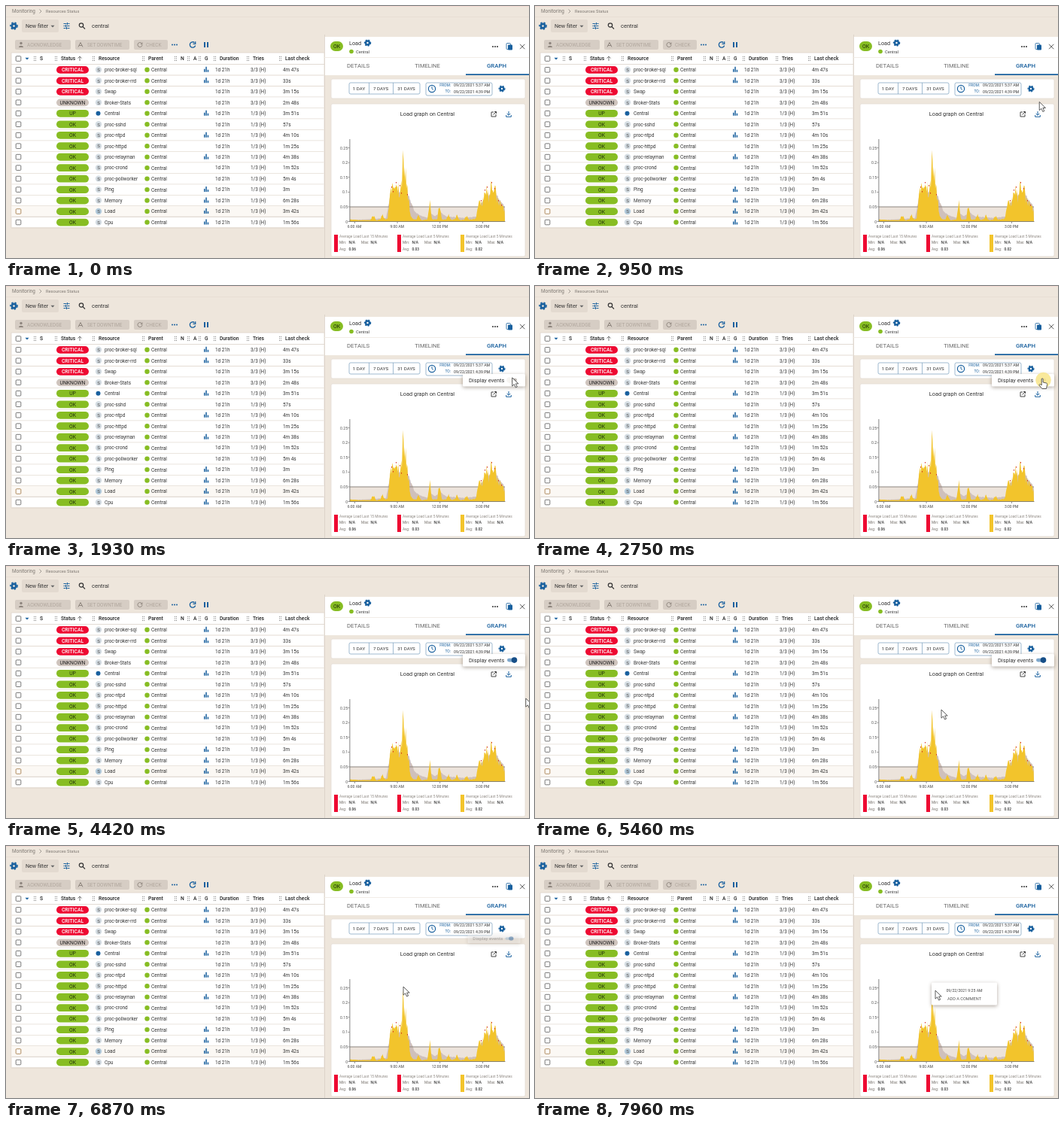
Animation, 695 px wide and 335 px high, one loop 8 s. Source, as an HTML page with a canvas:

```html
<!DOCTYPE html>
<html lang="en">
<head>
<meta charset="utf-8">
<style>
html, body { margin: 0; width: 100%; height: 100%; overflow: hidden; background: #eee6dc; }
canvas { display: block; }
</style>
</head>
<body>
<canvas id="stage" width="695" height="335"></canvas>
<script>
const LOOP = 8000;
const BG = '#eee6dc', BLUE = '#19609e', RED = '#ee0a32', GREEN = '#87bd23', YELLOW = '#f2c42c';
const INK = '#333', GREY = '#77716b', LINE = '#e4dcd3';
const stage = document.getElementById('stage');
let c;

// Drawing helpers
function box(x, y, w, h, fill, stroke, r = 0) {
  c.beginPath();
  c.roundRect(x, y, w, h, r);
  if (fill) { c.fillStyle = fill; c.fill(); }
  if (stroke) { c.strokeStyle = stroke; c.lineWidth = 0.8; c.stroke(); }
}
function text(s, x, y, size, color = INK, align = 'left', weight = 400) {
  c.font = `${weight} ${size}px Roboto, "Liberation Sans", sans-serif`;
  c.textAlign = align;
  c.textBaseline = 'middle';
  c.fillStyle = color;
  c.fillText(s, x, y + 0.5);
}
function disc(x, y, r, color) {
  c.beginPath();
  c.arc(x, y, r, 0, 7);
  c.fillStyle = color;
  c.fill();
}
function path(d, x, y, color, width, fill) {
  c.save();
  c.translate(x, y);
  const p = new Path2D(d);
  if (fill) { c.fillStyle = fill; c.fill(p); }
  if (width) { c.strokeStyle = color; c.lineWidth = width; c.stroke(p); }
  c.restore();
}
function raised(x, y, w, h) {
  c.save();
  c.shadowColor = 'rgba(60,40,20,.4)';
  c.shadowBlur = 5;
  c.shadowOffsetY = 1.5;
  box(x, y, w, h, '#fff', null, 1.5);
  c.restore();
}

// Icons
function gear(x, y, r) {
  c.strokeStyle = BLUE;
  c.lineWidth = r * 0.55;
  c.beginPath();
  c.arc(x, y, r * 0.55, 0, 7);
  c.stroke();
  c.lineWidth = r * 0.3;
  c.setLineDash([r * 0.46, r * 0.43]);
  c.beginPath();
  c.arc(x, y, r * 0.92, 0, 7);
  c.stroke();
  c.setLineDash([]);
}
function dots(x, y, color, r = 1) {
  for (const d of [-3, 0, 3]) disc(x + d, y, r, color);
}
function grip(x, y) {
  for (const dx of [0, 2]) for (const dy of [-2.5, 0, 2.5]) box(x + dx, y + dy - 0.5, 1, 1, '#777');
}
function bars(x, y) {
  box(x - 3, y - 1, 1.5, 4, BLUE);
  box(x - 0.7, y - 4, 1.5, 7, BLUE);
  box(x + 1.7, y, 1.5, 3, BLUE);
}
function checkbox(x, y, color = '#555') {
  box(x - 3.3, y - 3.3, 6.6, 6.6, '#fff', color, 1);
}
function caret(x, y, color) {
  path('M-2.5-1.2h5L0 1.5z', x, y, color, 0, color);
}

function topBars() {
  box(0, 0, 695, 335, BG);
  box(0, 0, 695, 1, '#f3d9d1');
  box(0, 14, 695, 1, '#e8dfd5');
  text('Monitoring', 8, 7, 6.4, '#7d7771');
  path('M-1.5-2.5L1 0l-2.5 2.5', 46, 7, '#8d8781', 0.8);
  text('Resources Status', 53, 7, 5.7, '#7d7771');

  gear(10.5, 26.5, 5);
  box(21, 18, 49, 17, '#e3dad0', null, 2);
  text('New filter', 26, 26.5, 7.1);
  caret(62, 27, '#666');
  path('M-4-3h4M2-3h2M-4 0h2M0 0h4M-4 3h3M1 3h3M1-4.5v3M-1-1.5v3M0 1.5v3', 80.5, 26.5, BLUE, 1.1);
  path('M1.2 1.2L4 4M1.7-1a2.7 2.7 0 1 1-5.4 0a2.7 2.7 0 1 1 5.4 0', 101, 26.5, INK, 1.2);
  text('central', 114, 26.5, 7.5);

  const actions = [[12, 74, 'ACKNOWLEDGE'], [92, 72, 'SET DOWNTIME'], [170, 45, 'CHECK']];
  for (const [x, w, label] of actions) {
    box(x, 45, w, 13, '#d6cdc4', null, 2);
    text(label, x + 16, 51.5, 6.4, '#b0a69d');
  }
  disc(20, 49.5, 1.7, '#8e857d');
  path('M-3 3c0-3 6-3 6 0z', 20, 52, 0, 0, '#8e857d');
  path('M-3 3L0-3L3 3M-2 1h4', 99, 51.5, '#8e857d', 1);
  path('M3 0a3 3 0 1 1-1-2.2M3-3v2H1', 178, 51.5, '#8e857d', 1);
  dots(224, 51.5, BLUE);
  path('M3.6 1A3.7 3.7 0 1 1 2.5-2.8M3.7-4.3v3.2H.5', 248, 51.5, BLUE, 1.3);
  box(263, 48, 2, 7, BLUE);
  box(267, 48, 2, 7, BLUE);
}

const ROWS = [
  ['CRITICAL', 'proc-broker-sql', '4m 47s', 1], ['CRITICAL', 'proc-broker-rrd', '33s', 1],
  ['CRITICAL', 'Swap', '3m 15s'], ['UNKNOWN', 'Broker-Stats', '2m 48s'],
  ['UP', 'Central', '3m 51s', 1], ['OK', 'proc-sshd', '57s'],
  ['OK', 'proc-ntpd', '4m 10s', 1], ['OK', 'proc-httpd', '1m 25s'],
  ['OK', 'proc-relayman', '4m 38s', 1], ['OK', 'proc-crond', '1m 52s'],
  ['OK', 'proc-pollworker', '5m 4s'], ['OK', 'Ping', '3m', 1],
  ['OK', 'Memory', '6m 28s', 1], ['OK', 'Load', '3m 42s', 1], ['OK', 'Cpu', '1m 56s', 1]
];
const PILL = { CRITICAL: [RED, '#fff'], UNKNOWN: ['#cfc4bd', '#222'] };

function table() {
  box(7, 62, 416, 233, '#fff', '#ddd4ca');
  checkbox(16.5, 70);
  caret(28, 70, BLUE);
  const heads = [[45, 'S'], [73, 'Status'], [123, 'Resource'], [189, 'Parent'], [232, 'N'],
    [249, 'A'], [264, 'G'], [284, 'Duration'], [328, 'Tries'], [371, 'Last check']];
  for (const [x, label] of heads) {
    grip(x - 8, 70);
    text(label, x, 70, 6.7, '#222', 'left', 500);
  }
  path('M0 3V-3M-2.5-.5L0-3L2.5-.5', 98, 70, '#555', 0.8);
  box(7, 77, 416, 0.8, '#d8cfc6');

  ROWS.forEach(([status, name, last, graph], i) => {
    const y = 84.8 + i * 14.48, picked = name === 'Load';
    const [fill, ink] = PILL[status] || [GREEN, '#22310a'];
    if (picked) box(7.5, y - 7, 415, 14, '#fbf8f4');
    box(7.5, y + 6.8, 415, 0.8, picked ? '#d8cfc6' : LINE);
    checkbox(16.5, y, picked ? '#9b6c34' : undefined);
    box(67, y - 4.8, 43, 9.8, fill, null, 4.9);
    text(status, 88.5, y, 6.8, ink, 'center', status === 'CRITICAL' ? 500 : 400);
    if (status === 'UP') {
      disc(122.5, y, 3, BLUE);
    } else {
      disc(123, y, 4.2, picked ? '#b3cbdc' : '#d5dde3');
      text('S', 123, y, 6.2, '#444', 'center');
    }
    text(name, 131, y, 6.4);
    disc(187.5, y, 3.2, GREEN);
    text('Central', 193, y, 6.6);
    if (graph) bars(266, y);
    text('1d 21h', 278, y, 6.4);
    text(i < 4 ? '3/3 (H)' : '1/3 (H)', 325, y, 6.4);
    text(last, 368, y, 6.4);
  });
}

function panel() {
  box(423, 38, 272, 297, BG);
  box(423, 41, 272, 51, '#fff');
  box(423, 38, 0.8, 297, '#d8cfc6');
  box(431, 47, 17, 13, GREEN, null, 6.5);
  text('OK', 439.5, 53.5, 7, '#22310a', 'center');
  text('Load', 456, 49, 7.3);
  gear(480.5, 49, 4.4);
  disc(459, 60.5, 2.8, GREEN);
  text('Central', 465, 60.5, 5.7, '#444');
  dots(650, 54, '#333');
  box(665, 49.5, 5.5, 8, null, BLUE, 1);
  box(667, 51.5, 6, 7, BLUE, null, 1);
  path('M-3-3.2L3.4 3.2M3.4-3.2L-3 3.2', 686, 54, '#444', 0.9);
  box(423, 68, 272, 0.8, '#eee7df');
  text('DETAILS', 468, 79.5, 7.8, '#666', 'center');
  text('TIMELINE', 560, 79.5, 7.6, '#666', 'center');
  text('GRAPH', 652, 79.5, 7.8, BLUE, 'center', 500);
  box(611, 90.3, 84, 1.7, BLUE);

  box(432, 97, 258, 26, '#fff', LINE, 2);
  box(456, 102, 94, 15, null, '#88a9c4', 2);
  box(482, 102, 0.8, 15, '#88a9c4');
  box(514, 102, 0.8, 15, '#88a9c4');
  text('1 DAY', 469, 109.5, 6.2, INK, 'center');
  text('7 DAYS', 498, 109.5, 6.2, INK, 'center');
  text('31 DAYS', 532, 109.5, 6.2, INK, 'center');
  box(558, 102, 88, 17, null, '#88a9c4', 2);
  c.beginPath();
  c.arc(566, 110, 4.6, 0, 7);
  c.strokeStyle = BLUE;
  c.lineWidth = 1.2;
  c.stroke();
  path('M0-3V0l2 1.5', 566, 110, BLUE, 0.9);
  text('FROM:', 591, 105, 5, BLUE, 'right');
  text('TO:', 591, 113.5, 5, BLUE, 'right');
  text('09/22/2021 5:37 AM', 595, 105, 5.2);
  text('09/22/2021 4:39 PM', 595, 113.5, 5.2);
  gear(659, 110, 4.2);

  box(432, 130, 258, 203, '#fff', LINE, 2);
  text('Load graph on Central', 560, 143, 7.4, INK, 'center');
  path('M0-3h-3v6h6V0M1-3.5h2.5V-1M3.5-3.5L-.5.5', 648, 144, '#333', 0.9);
  path('M0-4V1M-2.3-1L0 1.3L2.3-1M-3.3 1v2.3h6.6V1', 668, 144, BLUE, 1);
}

// Chart: [x, height in px] outlines
const LOAD1 = [[457, 3], [470, 2], [484, 2], [488, 10], [492, 2], [497, 3], [500, 11], [504, 3], [507, 5],
  [510, 36], [513, 52], [517, 46], [520, 54], [524, 50], [526, 62], [527.5, 105], [529, 66], [531, 88],
  [532.5, 52], [535, 38], [537, 12], [540, 4], [545, 3], [548, 9], [552, 2], [560, 3], [563.5, 29],
  [566, 3], [573, 3], [576, 28], [579, 3], [585, 3], [588, 11], [591, 3], [596, 3], [599, 10], [603, 2],
  [609, 3], [612, 9], [615, 3], [624, 4], [627, 20], [630, 34], [633, 30], [636, 45], [639, 50], [641, 36],
  [644, 57], [647, 40], [650, 54], [652, 32], [656, 30], [659, 24], [663, 18]];
const LOAD15 = [[457, 2], [480, 3], [505, 5], [511, 38], [520, 45], [527, 42], [532, 46], [537, 30], [543, 14],
  [549, 9], [560, 5], [564, 12], [570, 7], [577, 13], [585, 7], [610, 5], [625, 7], [631, 26], [640, 38],
  [650, 40], [656, 30], [663, 20]];

function heightAt(points, x) {
  const i = Math.max(1, points.findIndex(p => p[0] >= x));
  const [x0, h0] = points[i - 1], [x1, h1] = points[i];
  return h0 + (h1 - h0) * (x - x0) / (x1 - x0);
}
function area(points, rough, fill) {
  let seed = 11;
  c.beginPath();
  c.moveTo(457, 286.5);
  for (let x = 457; x <= 663; x += 0.75) {
    seed = seed * 16807 % 2147483647;
    c.lineTo(x, 286.5 - heightAt(points, x) * (1 - rough * (seed / 2147483647) ** 2));
  }
  c.lineTo(663, 286.5);
  c.fillStyle = fill;
  c.fill();
}
function chart() {
  box(457, 267, 206, 19.5, '#ece3db');
  area(LOAD15, 0.12, '#cfc0bb');
  box(457, 266.6, 206, 0.9, '#8d8580');
  area(LOAD1, 0.38, YELLOW);
  for (const [x, h] of [[512, 46], [514, 40], [518, 52], [523, 48], [525, 38], [533, 36], [631, 28],
    [636, 42], [639, 46], [645, 52], [649, 44], [654, 28], [658, 22]]) box(x, 286 - h, 1, 1.6, '#d22a20');
  box(456.5, 177, 0.8, 110, '#666');
  box(456.5, 286.3, 207, 0.8, '#666');
  ['0', '0.05', '0.1', '0.15', '0.2', '0.25'].forEach((label, i) => {
    const y = 286.5 - i * 19.6;
    box(454.5, y - 0.3, 2, 0.7, '#666');
    text(label, 454, y, 5.1, '#555', 'right');
  });
  ['6:00 AM', '9:00 AM', '12:00 PM', '3:00 PM'].forEach((label, i) => {
    const x = 463 + i * 56.7;
    box(x, 287, 0.7, 2, '#666');
    text(label, x, 293.5, 5, '#444', 'center');
  });
  [[436, RED, '15', '0.06'], [520, RED, '5', '0.03'], [604, YELLOW, '5', '0.02']].forEach(([x, color, mins, avg]) => {
    box(x, 304, 5, 23, color);
    text(`Average Load Last ${mins} Minutes`, x + 7, 306.5, 4.8, '#8f8983');
    for (const [label, value, dx, dy] of [['Min:', 'N/A', 7, 314.5], ['Max:', 'N/A', 36, 314.5], ['Avg:', avg, 7, 323]]) {
      text(label, x + dx, dy, 4.8, GREY);
      text(value, x + dx + 12.5, dy, 4.8, '#333', 'left', 500);
    }
  });
}

// Motion
const ramp = (t, a, b) => Math.min(1, Math.max(0, (t - a) / (b - a)));
const ease = p => p * p * (3 - 2 * p);

function optionsMenu(t) {
  const shown = ramp(t, 1270, 1480) * (1 - ramp(t, 6720, 6960));
  if (!shown) return;
  const k = 0.75 + 0.25 * shown, on = ease(ramp(t, 2860, 3000));
  c.save();
  c.globalAlpha = shown;
  c.translate(649, 118);
  c.scale(k, k * k);
  c.translate(-649, -118);
  raised(607, 117, 83, 16.5);
  text('Display events', 615, 125, 7.4);
  box(666, 122.7, 13, 4.8, on > 0.5 ? '#7fa8cc' : '#bdb8b3', null, 2.4);
  disc(669 + 6.5 * on, 125.1, 3.8, on > 0.5 ? '#174f88' : '#f7f5f2');
  c.restore();
}
function tooltip(t) {
  c.globalAlpha = 0.9 * ramp(t, 1170, 1240) * (1 - ramp(t, 1400, 1560));
  box(640, 123, 38, 8.5, '#917c6b', null, 1.5);
  text('Graph options', 659, 127, 5, '#fff', 'center');
  c.globalAlpha = 1;
}
function commentPopup(t) {
  if (t < 7270) return;
  c.globalAlpha = t < 7340 ? 0.6 : 1;
  raised(527, 181.5, 87, 30);
  text('09/22/2021 9:25 AM', 570.5, 191.5, 5.2, '#444', 'center');
  text('ADD A COMMENT', 570.5, 202.5, 5.6, '#555', 'center');
  c.globalAlpha = 1;
}
function halo(x, y, t, a, b) {
  if (t < a || t >= b) return;
  c.globalAlpha = 0.85 * ramp(t, a - 60, a + 140) * (1 - ramp(t, b - 80, b));
  disc(x, y, 10.3, '#f8e58a');
  c.globalAlpha = 1;
}

// [time, x, y] of the pointer tip
const TRACK = [[0, 710, 176], [400, 700, 174], [1240, 659, 110], [1300, 659, 110], [2070, 674, 123],
  [2860, 674, 123], [3560, 700, 126], [4340, 697, 175], [4420, 691, 176], [4780, 605, 188],
  [5180, 557, 192], [5460, 540, 191], [5940, 528, 187], [7870, 528, 187], [7960, 532, 192], [8000, 532, 192]];
const ARROW = 'M0 0V11.2L2.6 8.8L4.6 13L6.6 12.1L4.7 8H8.2Z';
const HAND = 'M-.8.8C-.8-.4 1.1-.4 1.1.8V5L5.5 6C6.6 6.4 6.7 7 6.5 8.5L5.5 13.5H-.2L-4 8.8C-4 7.2-2.3 7.2-.8 9Z';

function pointer(t) {
  const i = TRACK.findIndex(k => k[0] > t);
  const [t0, x0, y0] = TRACK[i - 1], [t1, x1, y1] = TRACK[i];
  let p = ramp(t, t0, t1);
  if (t < 4000) p = ease(p);
  const shape = t >= 2140 && t < 2960 ? HAND : ARROW;
  path(shape, x0 + (x1 - x0) * p, y0 + (y1 - y0) * p, '#333', 0.8, '#fff');
}

const still = document.createElement('canvas');
still.width = 695;
still.height = 335;
c = still.getContext('2d');
topBars();
table();
panel();
chart();
c = stage.getContext('2d');

function draw(now) {
  const t = now % LOOP;
  c.drawImage(still, 0, 0);
  optionsMenu(t);
  tooltip(t);
  commentPopup(t);
  halo(675.5, 125, t, 2470, 2900);
  halo(528.5, 190, t, 6670, 6850);
  pointer(t);
  requestAnimationFrame(() => draw(performance.now()));
}
draw(0);
</script>
</body>
</html>
```
